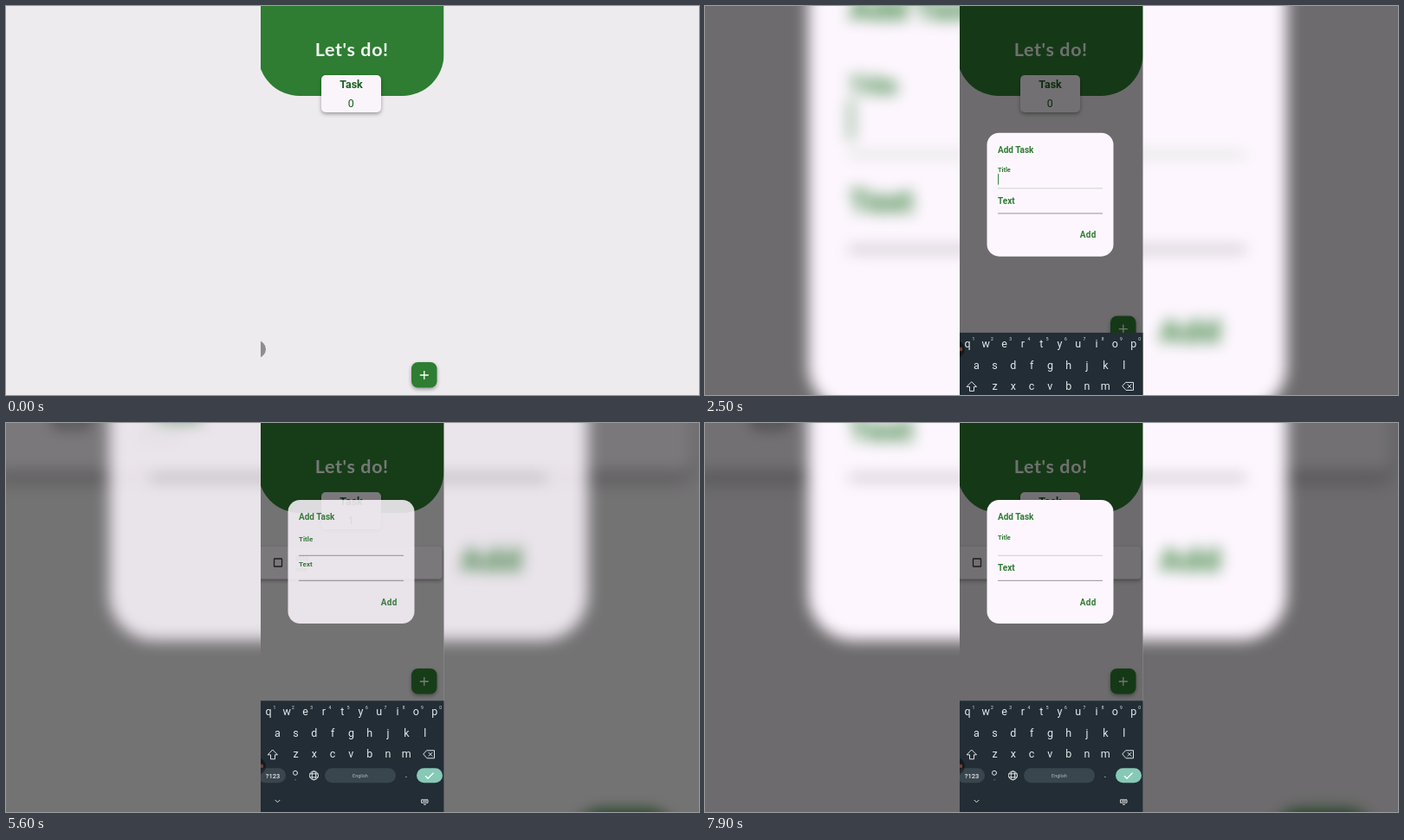
An HTML page for the animation above (8000 ms loop, 800 by 450 pixels).

```html
<!DOCTYPE html>
<html lang="en">
<head>
<meta charset="utf-8">
<title>To-do app demo</title>
<style>
html, body { margin: 0; width: 100%; height: 100%; overflow: hidden; background: #eeebee; }
svg { display: block; width: 800px; height: 450px; font-family: Roboto, sans-serif; }
text { dominant-baseline: alphabetic; }
.green { fill: #2e7d32; }
.bold { font-weight: 700; font-size: 10px; }
.mid { text-anchor: middle; }
.icon { fill: none; stroke: #dfe3e5; stroke-width: 1; stroke-linecap: round; stroke-linejoin: round; }
.shadow { filter: drop-shadow(0 2px 2px rgba(0, 0, 0, .35)); }
</style>
</head>
<body>
<svg viewBox="0 0 800 450">
  <defs>
    <clipPath id="screen"><rect x="294" width="211.5" height="450"/></clipPath>
    <filter id="blur" filterUnits="userSpaceOnUse" x="-40" y="-40" width="880" height="530" color-interpolation-filters="sRGB">
      <feGaussianBlur stdDeviation="8.5"/>
    </filter>
    <g id="app">
      <rect x="250" y="-20" width="300" height="490" fill="#eeebee"/>
      <rect class="green" x="291" y="-60" width="214.5" height="164" rx="48"/>
      <text class="mid" x="399.3" y="57.5" fill="#f4f6f4" font-family="Lato, sans-serif" font-weight="700" font-size="21.5" letter-spacing=".6">Let's do!</text>
      <g class="shadow"><rect x="364" y="80" width="69" height="43" rx="5" fill="#faf5fb"/></g>
      <g fill="#1b5e20" class="mid">
        <text x="398.5" y="95" font-weight="700" font-size="12.5">Task</text>
        <text id="count" x="398.3" y="116.5" font-size="12.5">0</text>
      </g>
      <g id="card">
        <g class="shadow"><rect x="289" y="143" width="214.5" height="37.5" rx="4" fill="#faf5fb"/></g>
        <rect x="309.5" y="157" width="9" height="9" rx=".6" fill="none" stroke="#3c3a3e" stroke-width="1.3"/>
        <text x="334" y="159" font-size="9.5" class="green">one</text>
        <text x="334" y="171.5" font-size="8" class="green">one</text>
      </g>
      <g id="fab">
        <g class="shadow"><rect class="green" x="468" y="412" width="29.5" height="29.5" rx="7.5"/></g>
        <path d="M477.8 427h10M482.8 422v10" stroke="#fff" stroke-width="1.3"/>
      </g>
      <rect id="scrim" x="250" y="-20" width="300" height="490"/>
      <g id="dialog">
        <rect x="325.5" width="146" height="143" rx="14" fill="#fdf6fe"/>
        <text class="green bold" x="338" y="23">Add Task</text>
        <g id="fields"></g>
        <text class="green bold" x="432.7" y="121.7" letter-spacing=".3">Add</text>
      </g>
    </g>
  </defs>

  <g filter="url(#blur)">
    <use href="#app" transform="translate(400 225) scale(3.785) translate(-399.75 -225)"/>
  </g>
  <g clip-path="url(#screen)">
    <use href="#app"/>
    <g id="keyboard">
      <rect x="290" width="220" height="132" fill="#222d35"/>
      <rect id="press" width="19" height="19" rx="2" fill="#3e4a51"/>
      <g id="keys" class="mid" fill="#e4e8ea"></g>
      <path class="icon" d="M308 57l5.5 5.5h-3v5h-5v-5h-3zM486 57.500h8.500v9h-8.500l-4-4.500zM488 60l4 4m0-4l-4 4"/>
      <g fill="#3a464d">
        <rect x="291" y="78" width="32" height="17" rx="8.500"/>
        <rect x="368" y="78" width="82" height="17" rx="8.500"/>
      </g>
      <rect x="474" y="78" width="30" height="17" rx="8.500" fill="#86c9b6"/>
      <path d="M484 87l3 3 6.500-6.500" fill="none" stroke="#fff" stroke-width="1.300"/>
      <g class="mid" fill="#e4e8ea">
        <text x="308" y="89.300" font-size="7.500" font-weight="500">?123</text>
        <text x="409" y="88.500" font-size="5.500" fill="#aeb8bd">English</text>
        <text x="334" y="91.500" font-size="6">,</text>
        <text x="462" y="89" font-size="11">.</text>
      </g>
      <g class="icon" stroke-width=".8">
        <circle cx="334" cy="83.500" r="2.500"/>
        <circle cx="355.500" cy="86.500" r="5"/>
        <ellipse cx="355.500" cy="86.500" rx="2.200" ry="5"/>
        <path d="M351 84.500h9M351 88.500h9M311 115l2.500 2.500 2.500-2.500"/>
        <path d="M480 114.500h7v3.500h-7zM481.500 116h4M482.500 120h2"/>
      </g>
    </g>
    <circle cx="290" cy="397" r="10" fill-opacity=".4"/>
    <circle id="dot" cx="295" cy="397" r="2.300" fill="#c0604c" opacity=".55"/>
  </g>
</svg>

<script>
const LOOP = 8000;
const ROWS = ["qwertyuiop", "asdfghjkl", "zxcvbnm"];
const ROW_X = [303, 313.3, 334.5], ROW_Y = [13, 37.5, 62], KEY_STEP = 21.3;
const $ = id => document.getElementById(id);

const ramp = (t, start, length) => Math.min(1, Math.max(0, (t - start) / length));
const easeOut = u => 1 - (1 - u) ** 2;
const smooth = u => u * u * (3 - 2 * u);
const during = (t, from, to) => t >= from && t < to;
const show = (node, on) => node.setAttribute("visibility", on ? "inherit" : "hidden");
const shift = (node, x, y) => node.setAttribute("transform", `translate(${x} ${y})`);

function add(parent, name, attrs, text = "") {
  const node = document.createElementNS("http://www.w3.org/2000/svg", name);
  for (const key in attrs) node.setAttribute(key, attrs[key]);
  node.textContent = text;
  parent.append(node);
  return node;
}

const keyPlace = {};
ROWS.forEach((row, r) => [...row].forEach((letter, i) => {
  const x = ROW_X[r] + i * KEY_STEP, y = ROW_Y[r];
  keyPlace[letter] = [x, y];
  add($("keys"), "text", { x, y: y + 4.2, "font-size": 12.5 }, letter);
  if (r === 0) add($("keys"), "text", { x: x + 7, y: y - 3.5, "font-size": 5 }, (i + 1) % 10);
}));

// "top" is the resting baseline of the label within the dialog.
function makeField(label, top) {
  const group = add($("fields"), "g", { transform: `translate(338 ${top})` });
  return {
    line: add(group, "path", { d: "M0 11.300h121", "stroke-width": .8 }),
    label: add(group, "text", { class: "green bold" }, label),
    value: add(group, "text", { y: 4.2, "font-size": 8.8, fill: "#3d8842" }),
    caret: add(group, "path", { d: "M.6-5.500v12.500", stroke: "#2e7d32" })
  };
}
const titleField = makeField("Title", 53);
const textField = makeField("Text", 82);

const TITLE_KEYS = [3000, 3250, 3500], TEXT_KEYS = [4450, 4720, 4980];
const CLEAR = 5540;
const typed = (t, times) => t < CLEAR ? "one".slice(0, times.filter(k => t >= k + 80).length) : "";

function drawField(field, t, { floated, focus, value }) {
  const focused = focus >= 0;
  shift(field.label, 0, -7.2 * floated);
  field.label.setAttribute("font-size", 10);
  field.label.style.fontSize = `${10 - 2.7 * floated}px`;
  field.line.setAttribute("stroke", focused ? "#b9cdbb" : "#7d7a7e");
  field.value.textContent = value;
  shift(field.caret, value.length * 4.9, 0);
  show(field.caret, focused && (t - focus) % 1000 < 500);
}

// Rise and fall of anything pushed up by the keyboard.
const lifted = (t, delay, length) =>
  easeOut(ramp(t, 2400 + delay, length)) -
  easeOut(ramp(t, 5680 + delay, 260)) +
  easeOut(ramp(t, 7450 + delay, length));

const opened = (t, lead, lag) =>
  ramp(t, 1600 - lead, 150) - ramp(t, 5580 + lag, 150) + ramp(t, 6430 - lead, 150);

const floating = (t, ...starts) =>
  starts.reduce((sum, start, i) => sum + (i % 2 ? -1 : 1) * smooth(ramp(t, start, 167)), 0);

function draw(t) {
  const added = t >= CLEAR;
  $("count").textContent = added ? "1" : "0";
  show($("card"), added);
  show($("dot"), t >= 500);

  $("scrim").setAttribute("opacity", .54 * opened(t, 10, 13));
  $("dialog").setAttribute("opacity", opened(t, 0, 0));
  const dialogLift = t > 5580 && t < 7000 ? (t < 5800 ? 1 : 0) : lifted(t, 85, 315);
  shift($("dialog"), 0, 153 - 64 * dialogLift);
  shift($("fab"), 0, -128 * lifted(t, 30, 300));
  shift($("keyboard"), 0, 450 - 128.7 * lifted(t, 0, 300));

  const titleFocus = during(t, 2250, 3950) ? 2250 : t >= 7350 ? 7350 : -1;
  drawField(titleField, t, {
    floated: floating(t, 2250, 5545, 7350),
    focus: titleFocus,
    value: typed(t, TITLE_KEYS)
  });
  drawField(textField, t, {
    floated: floating(t, 3950, 5545),
    focus: during(t, 3950, 5500) ? 3950 : -1,
    value: typed(t, TEXT_KEYS)
  });

  const index = [...TITLE_KEYS, ...TEXT_KEYS].findIndex(k => during(t, k, k + 130));
  show($("press"), index >= 0);
  if (index >= 0) {
    const [x, y] = keyPlace["one"[index % 3]];
    shift($("press"), x - 9.5, y - 9.5);
  }
}

const begin = performance.now();
function tick() {
  draw((performance.now() - begin) % LOOP);
  requestAnimationFrame(tick);
}
tick();
</script>
</body>
</html>
```
